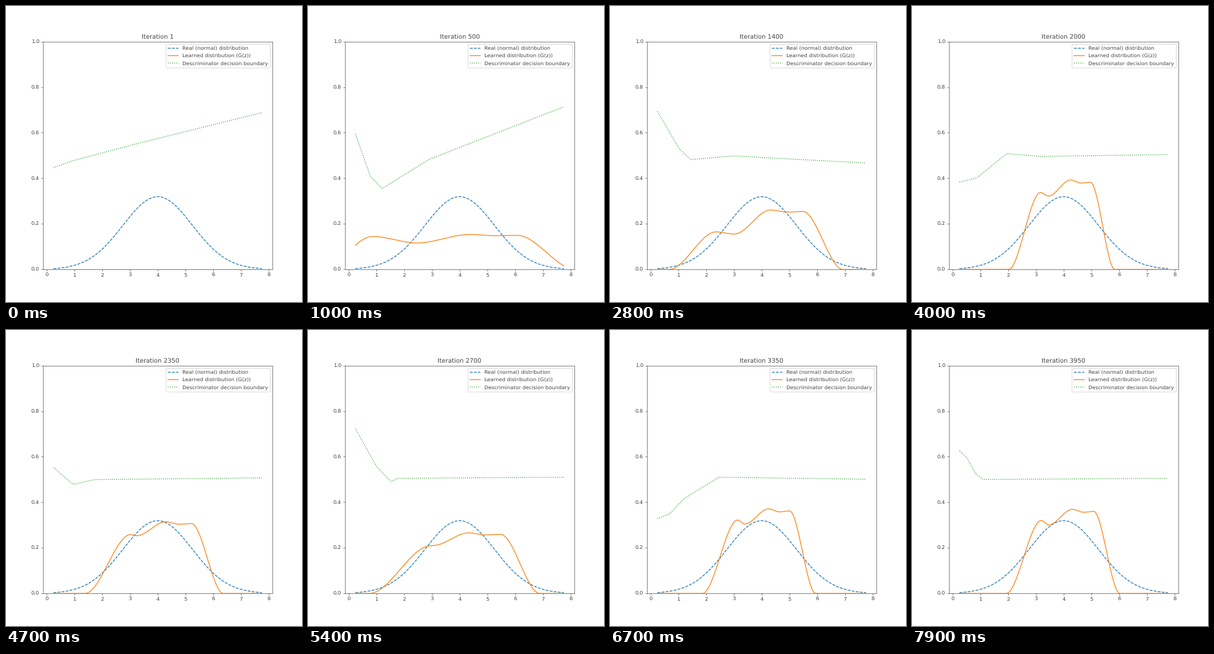
Animation, 480 px wide and 480 px high, one loop 8 s. Source, as a matplotlib script:

```python
import numpy as np
import matplotlib.pyplot as plt
from matplotlib.animation import FuncAnimation

FRAMES, INTERVAL, STEP = 80, 100, 50
MEAN, SIGMA = 4, 1.25
INK = "#444444"
x = np.linspace(MEAN - 3 * SIGMA, MEAN + 3 * SIGMA, 300)

# left foot, right foot, place of first hump, heights of first hump, dip, main hump
shapes = {
    0: (-0.03, 0.24, 0.20, 1.32, 1.06, 1.40),
    500: (-0.96, 8.17, 0.20, 1.32, 1.06, 1.40),
    1400: (0.67, 6.92, 0.27, 1.03, 0.97, 1.63),
    2000: (2.02, 5.84, 0.30, 1.29, 1.23, 1.50),
    2700: (0.75, 6.88, 0.36, 1.28, 1.29, 1.63),
    3350: (1.87, 5.94, 0.31, 1.31, 1.24, 1.51),
    3950: (1.93, 6.02, 0.31, 1.31, 1.23, 1.51),
}

# left height, three corners (x, y), right height
bounds = {
    0: (0.447, 0.95, 0.477, 2.90, 0.541, 5.00, 0.605, 0.688),
    500: (0.594, 0.79, 0.408, 1.21, 0.355, 2.90, 0.483, 0.714),
    1400: (0.694, 1.03, 0.530, 1.45, 0.482, 2.98, 0.498, 0.467),
    2000: (0.383, 0.88, 0.402, 1.95, 0.508, 3.16, 0.496, 0.504),
    2700: (0.723, 1.02, 0.555, 1.53, 0.491, 1.78, 0.505, 0.510),
    3350: (0.328, 0.70, 0.350, 1.20, 0.416, 2.47, 0.510, 0.501),
    3950: (0.626, 0.52, 0.595, 0.83, 0.526, 1.10, 0.500, 0.505),
}


def blend(poses, it):
    """Pose at iteration `it`, moving linearly from one pose to the next."""
    return [np.interp(it, list(poses), col) for col in zip(*poses.values())]


def waves(kx, ky):
    """Ease from each turning point to the next."""
    i = np.clip(np.searchsorted(kx, x) - 1, 0, len(kx) - 2)
    t = np.clip((x - kx[i]) / (kx[i + 1] - kx[i]), 0, 1)
    return ky[i] + (ky[i + 1] - ky[i]) * t * t * (3 - 2 * t)


def learned(it):
    """Three-humped density of area one, stretched between its feet."""
    left, right, first, hump, dip, main = blend(shapes, it)
    width = right - left
    kx = np.array([0, first, 0.375, 0.583, 0.68, 0.77, 1])
    ky = np.array([0, hump, dip, main, 0.965 * main, 0.975 * main, 0])
    return waves(left + width * kx, ky / width)


def boundary(it):
    y0, *corners, y1 = blend(bounds, it)
    return np.interp(x, [x[0], *corners[::2], x[-1]], [y0, *corners[1::2], y1])


plt.rcParams.update({
    "text.hinting": "none", "text.color": INK, "axes.edgecolor": INK,
    "xtick.color": INK, "ytick.color": INK,
})
fig, ax = plt.subplots(figsize=(8, 8), dpi=60)
real = np.exp(-((x - MEAN) / SIGMA) ** 2 / 2) / (SIGMA * np.sqrt(2 * np.pi))
ax.plot(x, real, "--", label="Real (normal) distribution")
gen_line, = ax.plot(x, 0 * x, "-", zorder=3, label="Learned distribution (G(z))")
dec_line, = ax.plot(x, 0 * x, ":", label="Descriminator decision boundary")
ax.set_xlim(-0.125, 8.125)
ax.set_ylim(0, 1)
ax.legend(loc="upper right")
title = ax.set_title("Iteration 1")


def update(frame):
    it = frame * STEP
    gen_line.set_ydata(learned(it))
    dec_line.set_ydata(boundary(it))
    title.set_text(f"Iteration {max(it, 1)}")
    return gen_line, dec_line, title


anim = FuncAnimation(fig, update, frames=FRAMES, interval=INTERVAL, repeat=True)
plt.show()
```
